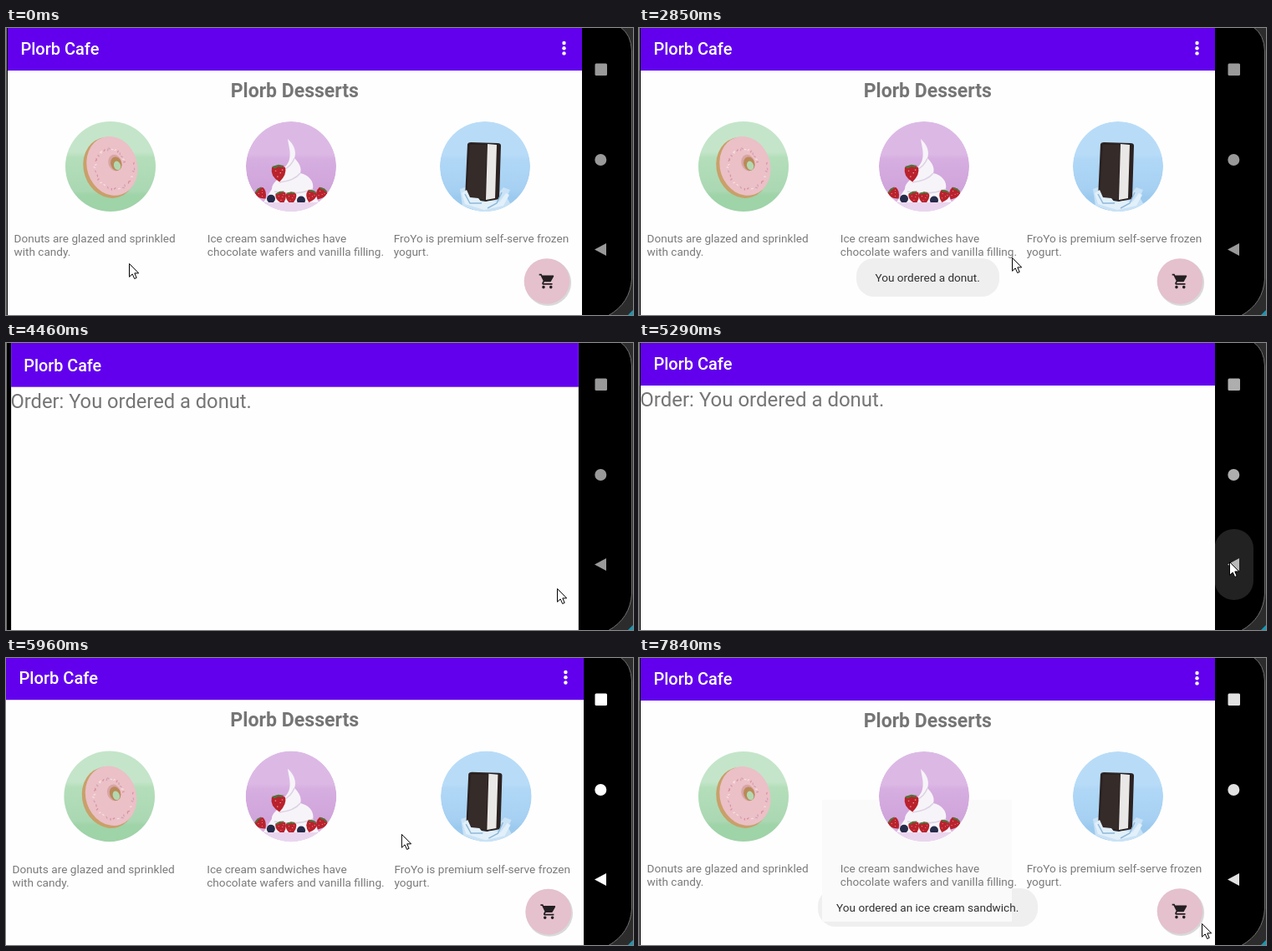
An HTML page for the animation above (7990 ms loop, 750 px wide and 344 px high).

```html
<!DOCTYPE html>
<html lang="en">
<head>
<meta charset="utf-8">
<title>Plorb Cafe</title>
<style>
  html, body { margin: 0; width: 100%; height: 100%; overflow: hidden; background: #000; }
  svg { display: block; width: 100vw; height: 100vh; font-family: Roboto, sans-serif; }
  .title { font-size: 20px; font-weight: 500; fill: #fff; }
  .heading { font-size: 23px; font-weight: 700; fill: #757575; text-anchor: middle; }
  .about { font-size: 13.58px; fill: #7a7a7a; }
  .order { font-size: 24px; fill: #757575; }
  .toast { font-size: 13.6px; fill: #303030; text-anchor: middle; }
</style>
</head>
<body>
<svg viewBox="0 0 750 344">
  <defs>
    <clipPath id="disc"><circle r="54"/></clipPath>
    <clipPath id="rim"><rect x="-54" y="-54" width="108" height="97"/></clipPath>
    <linearGradient id="green" x2="0" y2="1">
      <stop offset=".34" stop-color="#c4e5c9"/><stop offset=".4" stop-color="#b4deba"/>
      <stop offset=".77" stop-color="#aad8b2"/><stop offset=".82" stop-color="#9fd3a8"/>
    </linearGradient>
    <linearGradient id="purple" x2="0" y2="1">
      <stop offset=".36" stop-color="#dcb9e5"/><stop offset=".42" stop-color="#d6aee0"/>
      <stop offset=".76" stop-color="#d0a4db"/><stop offset=".82" stop-color="#d8b3e2"/>
    </linearGradient>
    <linearGradient id="blue" x2="0" y2="1">
      <stop offset=".36" stop-color="#b8dcf8"/><stop offset=".42" stop-color="#b0d7f6"/>
      <stop offset=".76" stop-color="#a6d0f2"/><stop offset=".84" stop-color="#9ccaef"/>
    </linearGradient>
    <g id="strawberry">
      <path d="M-7-5Q0-10 7-5Q9 2 1 10Q-9 4-7-5Z" fill="#b9222c"/>
      <path d="M-3-2v1M2 0v1M-1 4v1M4-3v1" stroke="#f0a0a0" stroke-width="1.2"/>
      <path d="M-7-6L0-8L6-7L3-5L0-6L-4-4Z" fill="#50743c"/>
    </g>
    <g id="bar">
      <rect x="2" y="-20" width="687" height="400" fill="#fefefe"/>
      <rect x="2" y="-20" width="687" height="71" fill="#6200ee"/>
      <text class="title" x="17.4" y="31.7">Plorb Cafe</text>
    </g>
  </defs>

  <rect width="750" height="344"/>
  <path d="M.5 0V344" stroke="#777"/>
  <path d="M735-1Q748 8 748.5 28V300Q747 330 720 345H752V-1Z" fill="#2c2c2c" stroke="#707070"/>
  <path d="M744 344L750 338V344Z" fill="#1698b5"/>
  <rect id="backRipple" x="688.5" y="223" width="46.5" height="85" rx="23" fill="#fff"/>
  <g id="navIcons" fill="#fff">
    <rect x="704.5" y="42.5" width="14.5" height="14.5" rx="1.5"/>
    <circle cx="711.3" cy="158" r="7"/>
    <path d="M704 265.5L718 258V273Z"/>
  </g>

  <g id="menuPage">
    <use href="#bar"/>
    <g fill="#fff"><circle cx="667.5" cy="18" r="2.2"/><circle cx="667.5" cy="24.2" r="2.2"/><circle cx="667.5" cy="30.4" r="2.2"/></g>
    <rect id="toastBox" y="276" height="46" rx="21" fill="#efefef"/>
    <rect id="toastVeil" x="219" y="170" width="227" height="146" fill="#fafafa"/>
    <text id="toastText" class="toast" x="345.2" y="304.4"></text>
    <text class="heading" x="345.3" y="82.5">Plorb Desserts</text>

    <g transform="translate(125 166)">
      <circle r="54" fill="url(#green)"/>
      <g transform="rotate(-18)">
        <ellipse cx="-1.5" cy="1" rx="31" ry="37" fill="#c9a06a"/>
        <ellipse cx="2" cy="0" rx="30" ry="36" fill="#ebc0c7"/>
        <g id="sprinkles" stroke-width="1.3" stroke-linecap="round"></g>
        <ellipse cx="6.5" cy="-2.5" rx="8" ry="10" fill="#d8a5a6"/>
        <ellipse cx="7.5" cy="-1" rx="6.5" ry="8.5" fill="#b98a58"/>
        <ellipse cx="8" cy="1.5" rx="4" ry="5.5" fill="#b3d8b0"/>
      </g>
    </g>

    <g transform="translate(341 166)" clip-path="url(#disc)">
      <circle r="54" fill="url(#purple)"/>
      <path d="M-31 43H31Q28 58 0 58T-31 43Z" fill="#ead5ee"/>
      <g clip-path="url(#rim)">
        <path d="M-4-33C3-27 7-18 4-10C10-4 13 2 11 8C21 10 28 18 26 27L33 43H-33L-23 27C-23 18-13 16-13 9C-10 2-3-2-2-9C0-17-3-25-4-33Z" fill="#f7f4f9"/>
        <path d="M4-10Q0 0-9 4M11 8Q4 17-14 19M26 27Q8 35-20 30" fill="none" stroke="#ddd3e4" stroke-width="1.6"/>
        <use href="#strawberry" transform="translate(-15 7) scale(1.15)"/>
        <g id="berries"></g>
      </g>
    </g>

    <g transform="translate(573 166)" clip-path="url(#disc)">
      <circle r="54" fill="url(#blue)"/>
      <path d="M-30 27L-21 24L-17 31L16 32L22 25L30 28L26 37L31 46L20 52L-2 56L-27 47Z" fill="#c9e2f5"/>
      <path d="M-21-27Q-20-29-17-29L15-28Q19-28 19-25L17 39L1 42L-24 38Z" fill="#2b2221"/>
      <path d="M3-27L14-26L12 38L1 40Z" fill="#e9e8e7"/>
      <path d="M-18-26L2-26L0 40L-22 37Z" fill="#352b29"/>
      <path d="M-28 32L-22 28L-18 37L-8 38L-4 43L8 41L17 43L25 32L29 34L22 47L-1 52L-24 45Z" fill="#e2f0fa"/>
      <path d="M-24 33L-18 44L-4 44M20 31L14 44L3 50" fill="none" stroke="#8fb9da" stroke-width="1.5"/>
    </g>

    <g id="descriptions" class="about"></g>

    <circle cx="648.3" cy="305.2" r="27.8" fill="#d9d9d9"/>
    <circle cx="647" cy="303.5" r="27.3" fill="#e4c1cd"/>
    <circle id="cartPress" cx="647" cy="303.5" r="27.3"/>
    <path transform="translate(636.8 292.9) scale(.88)" fill="#241f22" d="M7 18a2 2 0 1 0 .01 0ZM17 18a2 2 0 1 0 .01 0ZM1 2v2h2l3.6 7.6-1.35 2.4C4.5 15.4 5.5 17 7 17h12v-2H7.4c-.2 0-.3-.2-.2-.4l.9-1.6h7.45c.75 0 1.4-.4 1.75-1l3.6-6.5C21.2 4.8 20.7 4 20 4H5.2l-.93-2Z"/>
  </g>

  <g id="orderPage">
    <use href="#bar"/>
    <text class="order" x="1.3" y="76.4">Order: You ordered a donut.</text>
  </g>

  <path id="cursor" d="M.5 .5V16.3L4.2 12.9L6.7 18.5L9.2 17.4L6.8 11.9H11.7Z" fill="#fff" stroke="#000"/>
</svg>

<script>
const LOOP = 7990;
const OPEN_ORDER = 4425, CLOSE_ORDER = 5785;
const el = id => document.getElementById(id);
const set = (id, attrs) => Object.entries(attrs).forEach(([k, v]) => el(id).setAttribute(k, v));

const ramp = (t, start, length) => Math.min(1, Math.max(0, (t - start) / length));
const pulse = (t, start, length = 272) => t < start ? 0 : 1 - ramp(t, start, length);
const easeOut = u => 1 - (1 - u) ** 2;
const zoom = s => `translate(345 190) scale(${s}) translate(-345 -190)`;

const refresh = t => Math.floor((t - 73) / 136) * 136 + 73;

// Mouse strokes, each easing out into its end point.
const strokes = [
  { start: 890, end: 1161, to: [134, 197] },
  { start: 2650, end: 2793, to: [446, 275] },
  { start: 2793, end: 3337, to: [659, 294] },
  { start: 4561, end: 4833, to: [706, 262] },
  { start: 5730, end: 6193, to: [350, 184] },
  { start: 7150, end: 7281, to: [446, 170] },
  { start: 7281, end: 7417, to: [535, 138] },
  { start: 7417, end: 7689, to: [673, 318] }
];
const cursorAt = t => strokes.reduce((from, { start, end, to }) => {
  const u = easeOut(ramp(t, start, end - start));
  return from.map((v, i) => v + (to[i] - v) * u);
}, [147, 282]);

el('descriptions').innerHTML = [
  [9.5, 'Donuts are glazed and sprinkled', 'with candy.'],
  [240.8, 'Ice cream sandwiches have', 'chocolate wafers and vanilla filling.'],
  [463.7, 'FroYo is premium self-serve frozen', 'yogurt.']
].map(([x, ...lines]) => lines.map((line, i) =>
  `<text x="${x}" y="${257.3 + i * 16}">${line}</text>`).join('')).join('');

el('sprinkles').innerHTML = Array.from({ length: 34 }, (_, i) => {
  const angle = i * 2.4, r = .5 + .42 * ((i * .618) % 1);
  const x = 2 + 29 * r * Math.cos(angle), y = 35 * r * Math.sin(angle);
  const color = ['#d9929f', '#f6dedf', '#d3a0b2'][i % 3];
  return `<path d="M${x} ${y}l${1.8 * Math.cos(i)} ${1.8 * Math.sin(i)}" stroke="${color}"/>`;
}).join('');

// A row of fruit along the rim, higher towards its ends.
el('berries').innerHTML = Array.from({ length: 7 }, (_, i) => {
  const x = (i - 3) * 12, y = 37 - x * x / 260;
  return i % 3 === 1
    ? `<circle cx="${x}" cy="${y + 4}" r="5" fill="#262b49"/>`
    : `<use href="#strawberry" transform="translate(${x} ${y}) rotate(${x}) scale(.85)"/>`;
}).join('');

function draw(t) {
  const second = t > CLOSE_ORDER;
  const boxWidth = second ? 263 : 171;
  const toast = ramp(t, 1770, 479) - ramp(t, 3745, 408) + ramp(t, 6800, 479);
  const ordering = t >= OPEN_ORDER && t < CLOSE_ORDER;

  set('cursor', { transform: `translate(${cursorAt(t)})` });
  set('toastBox', { x: 345.5 - boxWidth / 2, width: boxWidth, opacity: toast ** 2 });
  set('toastText', { opacity: toast });
  el('toastText').textContent = `You ordered ${second ? 'an ice cream sandwich' : 'a donut'}.`;
  set('toastVeil', { opacity: t >= 7281 ? 1 : 0 });
  set('cartPress', { opacity: .24 * pulse(t, 3745) });
  set('backRipple', { opacity: .135 * pulse(t, 5241) });
  set('navIcons', { opacity: .6 + .4 * (ramp(t, 5170, 343) - ramp(t, 7725, 343)) });
  set('menuPage', {
    transform: zoom(1 + .03 * pulse(t, CLOSE_ORDER, 408) ** 4),
    display: ordering ? 'none' : 'inline'
  });
  set('orderPage', {
    transform: zoom(1 - .012 * pulse(t, OPEN_ORDER) ** 2),
    display: ordering ? 'inline' : 'none'
  });
}

const begin = performance.now();
function tick() {
  draw(refresh((performance.now() - begin) % LOOP));
  requestAnimationFrame(tick);
}
tick();
</script>
</body>
</html>
```
